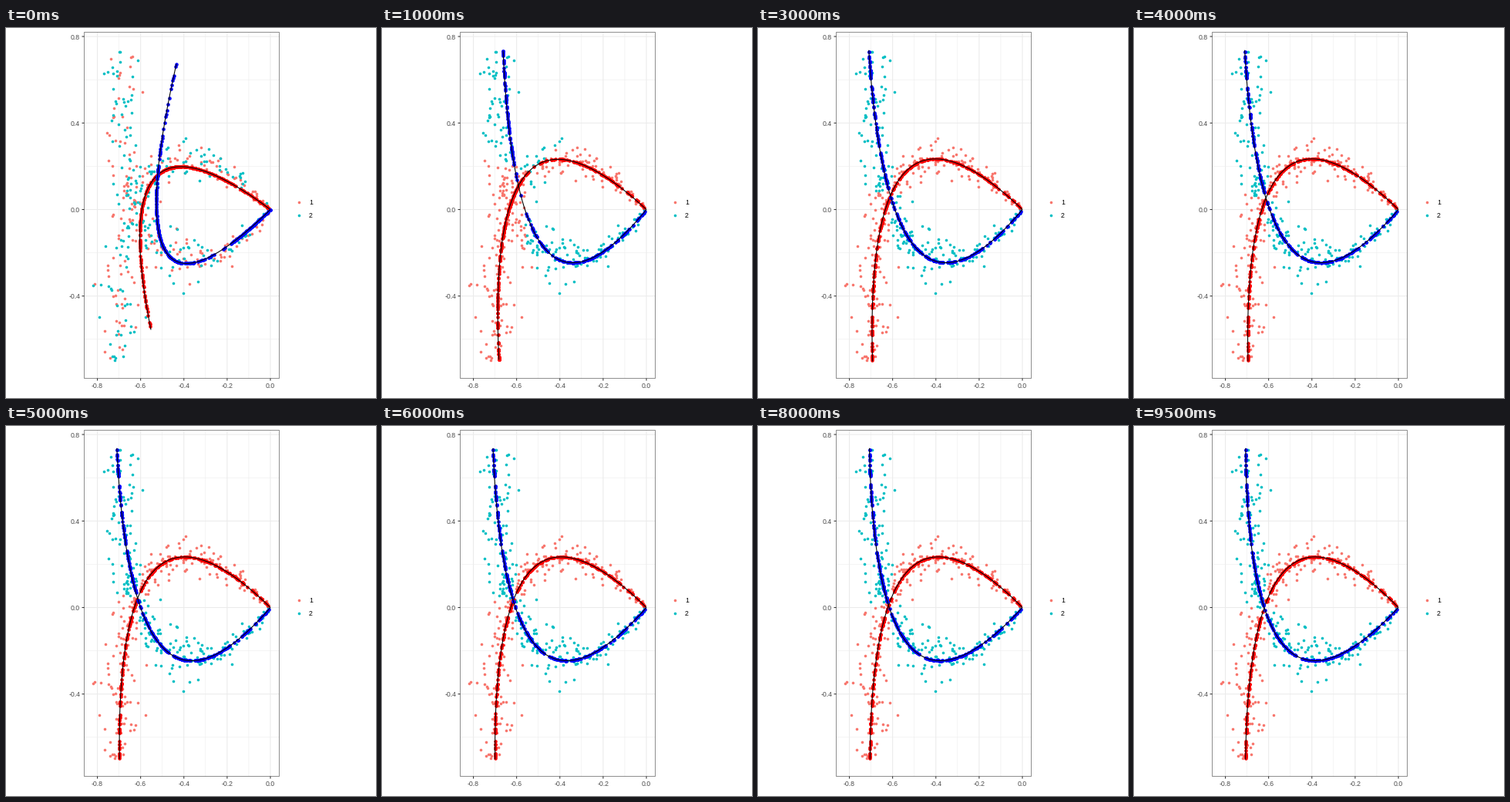
These frames come from a looping animation (480x480 px, 10000 ms). A matplotlib script:

```python
import numpy as np
import matplotlib.pyplot as plt
from matplotlib.animation import FuncAnimation
from matplotlib.patches import Rectangle

SIZE, DPI = 480, 100
PX = 72 / DPI                      # one pixel in points
X0, Y0, UNIT = 343, 235.5, 280.6   # pixel position of (0, 0), pixels per unit
LEFT, RIGHT, TOP, BOTTOM = 101.5, 354.5, 5.5, 454.5
GROUP_COLORS = ["#F8766D", "#00BFC4"]
CURVE_COLORS = ["#FF0000", "#0000FF"]
FRAMES, INTERVAL = 20, 500
LAST_STEP = FRAMES // 2 - 1

# Each curve is a quadratic from the origin: control x, y and end x, y.
# Iterations cancel the first error quickly, then drift slowly.
BASE = np.array([(-212, -197, -192.5, 197), (-162.5, 207, -200.5, -206.8)])
DRIFT = np.array([(2.1, 0, -.65, 0), (-3.45, 0, .25, 0)])
ERROR = np.array([(-7, 33, 37.5, -41), (-47.5, -2.5, 78.5, 18)])
RATE = np.array([(3, 3, 3, 3), (3, 3, 1.7, 3)])


def fit_at(group, step):
    return (BASE + DRIFT * step + ERROR * np.exp(-RATE * step))[group]


def bezier(fit, t):
    t = np.asarray(t)[:, None]
    return 2 * t * (1 - t) * fit[:2] + t ** 2 * fit[2:] + (X0, Y0)


rng = np.random.default_rng(7)
grid_t = np.linspace(0, 1, 401)


def make_cloud(group, count=222):
    u = (np.arange(count) + rng.random(count)) / count
    t = np.interp(u, [0, .09, .46, .82, 1], [0, .1, .5, .87, 1])
    spread = np.interp(t, [0, .1, .3, .7, 1], [2, 6, 14, 14, 11])
    noise = np.clip(rng.normal(size=(count, 2)), -2.2, 2.2) * spread[:, None]
    x, y = (bezier(fit_at(group, LAST_STEP), t) + noise).T
    return np.column_stack([np.minimum(x, 342), np.clip(y, 31, 431)])


stragglers = [(113, 334), (115, 332), (170.5, 41.5), (177, 83), (181, 375),
              (230, 344)]
points = np.vstack([make_cloud(0), make_cloud(1), stragglers])

# Random first grouping, with random positions along the curves.
start_labels = rng.integers(0, 2, len(points))
start_u = rng.permutation(np.linspace(0, 1, len(points)))
start_t = np.where(start_labels == 0,
                   np.interp(start_u, [0, .88, 1], [0, .8, 1]),
                   np.interp(start_u, [0, .3, .34, .92, 1],
                             [0, .14, .28, .86, 1]))


def assign(step):
    """Nearest curve and position along it for each point."""
    if step < 0:
        return start_labels, start_t
    dist, pos = [], []
    for group in (0, 1):
        curve = bezier(fit_at(group, step), grid_t)
        d = np.hypot(*(points[:, None] - curve).transpose(2, 0, 1))
        dist.append(d.min(axis=1))
        pos.append(grid_t[d.argmin(axis=1)])
    labels = np.argmin(dist, axis=0)
    return labels, np.where(labels == 0, *pos)


fig = plt.figure(figsize=(SIZE / DPI, SIZE / DPI), dpi=DPI, facecolor="white")
ax = fig.add_axes([0, 0, 1, 1])
ax.set(xlim=(0, SIZE), ylim=(SIZE, 0))
ax.axis("off")


def line(xs, ys, color, width, z):
    return ax.plot(xs, ys, color=color, lw=width * PX, zorder=z,
                   solid_capstyle="butt", snap=False)[0]


def dots(xs, ys, color, diameter, z):
    return ax.plot(xs, ys, "o", color=color, ms=diameter * PX, mew=0,
                   zorder=z, snap=False)[0]


def text(x, y, label, color="#4D4D4D", **align):
    ax.text(x, y, label, color=color, fontsize=8.8 * PX,
            family="Liberation Sans", va="center_baseline", **align)


def draw_panel():
    for i in range(-8, 1):
        x, major = X0 + i / 10 * UNIT, i % 2 == 0
        line([x, x], [TOP, BOTTOM], "#EBEBEB", 1.07 if major else .53, 1)
        if major:
            line([x, x], [BOTTOM, BOTTOM + 3], "#333333", 1.07, 8)
            text(x, 463.5, f"{i / 10:.1f}", ha="center")
    for i in range(-3, 5):
        y, major = Y0 - i / 5 * UNIT, i % 2 == 0
        line([LEFT, RIGHT], [y, y], "#EBEBEB", 1.07 if major else .53, 1)
        if major:
            line([LEFT - 3, LEFT], [y, y], "#333333", 1.07, 8)
            text(96.2, y, f"{i / 5:.1f}", ha="right")
    ax.add_patch(Rectangle((LEFT, TOP), RIGHT - LEFT, BOTTOM - TOP, fill=False,
                           ec="#333333", lw=.55 * PX, zorder=8, snap=False))
    for group, y in enumerate((225.6, 242.9)):
        dots([379.5], [y], GROUP_COLORS[group], 3.6, 5)
        text(393, y, str(group + 1), "black", ha="left")


draw_panel()
clouds = [dots([], [], c, 3.6, 3) for c in GROUP_COLORS]
fitted = [dots([], [], c, 4.6, 4 + 2 * g) for g, c in enumerate(CURVE_COLORS)]
curves = [line([], [], "black", 1.07, 5 + 2 * g) for g in (0, 1)]


def update(frame):
    # Even frames refit the curves, odd frames reassign the points.
    labels, t = assign((frame - 1) // 2)
    for group in (0, 1):
        mine = labels == group
        fit = fit_at(group, frame // 2)
        clouds[group].set_data(*points[mine].T)
        fitted[group].set_data(*bezier(fit, t[mine]).T)
        curves[group].set_data(*bezier(fit, grid_t).T)
    return clouds + fitted + curves


anim = FuncAnimation(fig, update, frames=FRAMES, interval=INTERVAL,
                     repeat=True, repeat_delay=0, blit=False)
plt.show()
```
